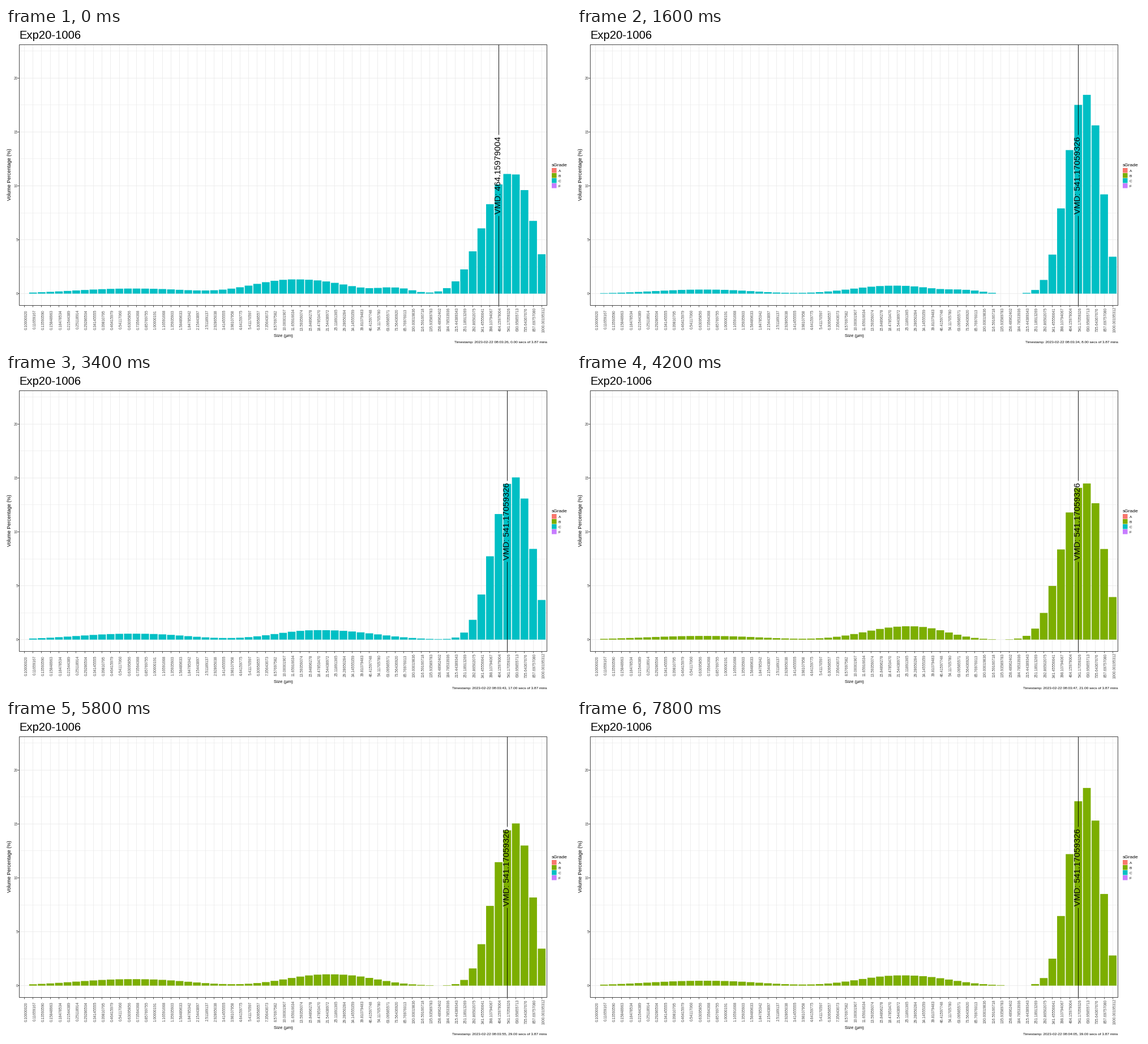
Animation, 998 px wide and 561 px high, one loop 8 s. Source, as a matplotlib script:

```python
import numpy as np
import matplotlib.pyplot as plt
from matplotlib.animation import FuncAnimation
from matplotlib.patches import Rectangle

W, H, DPI = 998, 561, 100
PX = 72 / DPI
LEFT, RIGHT, TOP, BOTTOM = 23.4, 955.4, 29.5, 489.5
MIDDLE = (TOP + BOTTOM) / 2
STEP = (RIGHT - LEFT) / 61.2
UNIT = (BOTTOM - TOP) / 24.2
ZERO = BOTTOM - 1.1 * UNIT
BINS = np.arange(61)
SECONDS = 40
COLORS = {"A": "#F8766D", "B": "#7CAE00", "C": "#00BFC4", "F": "#C77CFF"}

# Single-precision log scale, fifteen bins per decade
sizes = np.float32(10 ** (BINS / 15 - 1) * 1.00000195)
labels = [f"{s:.8f}" for s in sizes]

# second, grade, fine (height, width), middle (height, centre, width),
# side height, coarse (height, centre, width)
KEYS = [
    (0, "C", .47, 9.3, 1.32, 31.3, 8.0, .46, 11.2, 56.45, 4.35),
    (4, "C", .42, 6.7, 0.50, 34.2, 7.0, .53, 16.2, 56.8, 3.45),
    (12, "B", .33, 9.3, 0.98, 35.1, 5.2, 0, 15.45, 56.7, 3.5),
    (17, "C", .55, 9.0, 0.88, 34.0, 8.7, 0, 15.1, 56.75, 3.33),
    (21, "B", .34, 9.4, 1.24, 36.3, 5.7, 0, 14.55, 56.7, 3.58),
    (22, "B", .35, 9.3, 1.20, 36.2, 5.9, 0, 13.2, 56.55, 4.0),
    (29, "B", .60, 9.2, 1.05, 35.3, 7.0, 0, 15.1, 56.75, 3.23),
    (39, "B", .45, 9.2, 0.95, 35.5, 7.2, 0, 18.4, 56.78, 2.72),
]
TIMES, GRADES, *PARAMS = zip(*KEYS)
TIMES = np.array(TIMES)


def bell(height, centre, left, right):
    """Peak with its own width and steepness on each side."""
    d = BINS - centre
    power = np.where(d < 0, (np.abs(d) / left) ** 2.1, (np.abs(d) / right) ** 2.4)
    return height * np.exp(-power)


def volumes(second):
    fine, fine_w, mid, mid_c, mid_w, side, coarse, coarse_c, coarse_w = (
        np.interp(second, TIMES, p) for p in PARAMS)
    # The coarse peak grows narrower and taller between two key times
    phase = np.interp(second, TIMES, np.arange(len(TIMES)))
    focus = 1 + 0.17 * np.sin(np.pi * phase) ** 2
    coarse_w /= focus
    v = (bell(fine, 12.5, fine_w, fine_w * 0.93)
         + bell(mid, mid_c, 6.7, mid_w)
         + bell(side, 43, 2.6, 2.6)
         + bell(coarse * focus, coarse_c, coarse_w, 0.95 + 0.56 * coarse_w))
    v[0] = 0
    return np.where(v < 0.025, 0, v)


def median_bin(v):
    from_top = np.cumsum(v[::-1])
    return len(v) - 1 - int(np.searchsorted(from_top, v.sum() / 2))


def grade_at(second):
    return GRADES[int(np.argmin(np.abs(TIMES - second)))]


plt.rcParams["font.family"] = "Liberation Sans"
fig = plt.figure(figsize=(W / DPI, H / DPI), dpi=DPI, facecolor="white")
ax = fig.add_axes([0, 0, 1, 1])
ax.set(xlim=(0, W), ylim=(H, 0))
ax.axis("off")


def bin_x(k):
    return LEFT + (k + 0.6) * STEP


def crisp(p):
    """Centre of the pixel that holds p."""
    return np.floor(p) + 0.5


def text(x, y, s, px, color="black", ha="left", va="baseline", rotation=0):
    return ax.text(x, y, s, fontsize=px * PX, color=color, ha=ha, va=va,
                   rotation=rotation, zorder=6)


def line(x, y, color, px, z=1):
    return ax.plot(crisp(x), crisp(y), color=color, lw=px * PX, zorder=z,
                   solid_capstyle="butt", snap=False)[0]


def box(x, y, w, h, z=2, **style):
    return ax.add_patch(Rectangle((x, y), w, h, snap=False, zorder=z, **style))


for v in np.arange(0, 23, 2.5):
    y = ZERO - v * UNIT
    major = v % 5 == 0
    line([LEFT, RIGHT], [y, y], "#EBEBEB", 0.9 if major else 0.6)
    if major:
        line([LEFT - 2.7, LEFT], [y, y], "#333333", 0.8)
        text(21, y, f"{v:.0f}", 6.7, "#4D4D4D", "right", "center_baseline")

for x, label in zip(bin_x(BINS), labels):
    line([x, x], [TOP, BOTTOM], "#EBEBEB", 0.9)
    line([x, x], [BOTTOM, BOTTOM + 2.7], "#333333", 0.8)
    text(x + 3.5, 514.3, label, 6.7, "#4D4D4D", "center", "center", 90)

box(crisp(LEFT), crisp(TOP), RIGHT - LEFT, BOTTOM - TOP, z=5, fill=False,
    ec="#333333", lw=0.9 * PX)

text(23.3, 19, "Exp20-1006", 20.3)
text(7, 258.5, "Volume Percentage (%)", 8.6, ha="center", va="center", rotation=90)
text(489.5, 545.3, "Size (µm)", 7.9, ha="center")
text(964, 243.8, "sGrade", 8.5)
for n, (name, color) in enumerate(COLORS.items()):
    box(964, 247 + 9 * n, 8.5, 8.5, fc=color, lw=0)
    text(976, 253.8 + 9 * n, name, 6.5)

bars = [box(x - 0.45 * STEP, ZERO, 0.9 * STEP, 0, lw=0) for x in bin_x(BINS)]
marks = [line([0, 0], span, "black", 0.9, 4)
         for span in ([TOP, MIDDLE - 71.5], [MIDDLE + 71.5, BOTTOM])]
vmd = text(0, MIDDLE, "", 14.9, ha="center", va="center", rotation=90)
stamp = text(956, 556.3, "", 6.5, ha="right")


def draw(second):
    v = volumes(second)
    color = COLORS[grade_at(second)]
    for bar, value in zip(bars, v):
        bar.set_height(-value * UNIT)
        bar.set_facecolor(color)

    k = median_bin(v)
    for mark in marks:
        mark.set_xdata([crisp(bin_x(k))] * 2)
    vmd.set_x(bin_x(k))
    vmd.set_text(f"VMD: {labels[k]}")

    minute, sec = divmod(3 * 60 + 26 + second, 60)
    stamp.set_text(f"Timestamp: 2023-02-22 08:{minute:02d}:{sec:02d}, "
                   f"{second:.2f} secs of 3.87 mins")
    return [*bars, *marks, vmd, stamp]


anim = FuncAnimation(fig, draw, frames=SECONDS, interval=200, repeat=True,
                     repeat_delay=0, blit=False)
plt.show()
```
